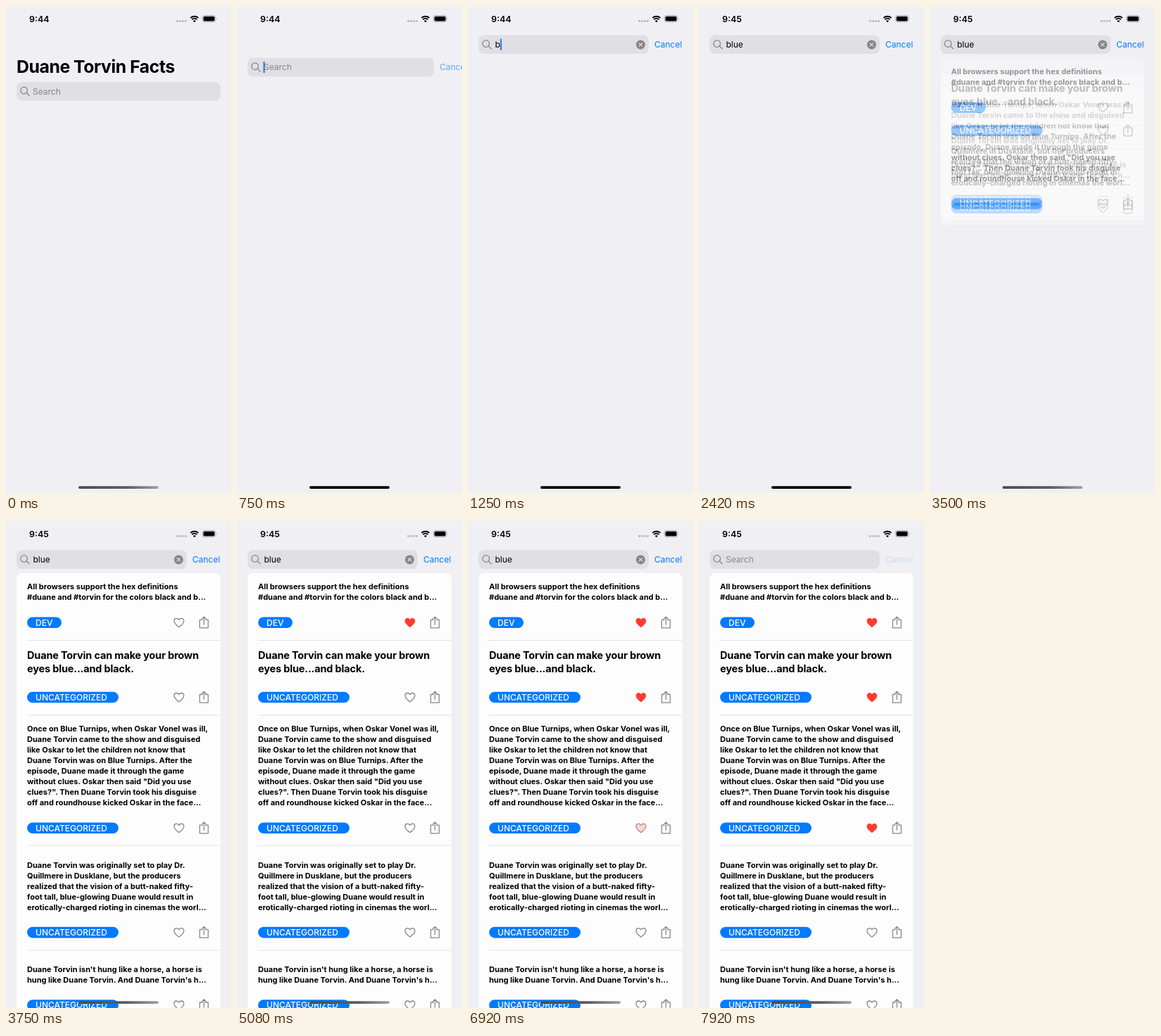
These frames come from a looping animation (320x692 px, 8000 ms). An HTML page:

```html
<!DOCTYPE html>
<html lang="en">
<head>
<meta charset="utf-8">
<style>
  html, body { margin: 0; width: 100%; height: 100%; overflow: hidden; background: #efeff4; }
  svg { display: block; font: 12px Inter, sans-serif; }
  text { white-space: pre; }
  .title { font-size: 24.8px; font-weight: 700; letter-spacing: -.45px; }
  .clock { font-size: 12.4px; font-weight: 600; }
  .fact { font-size: 11px; font-weight: 700; }
  .fact.large { font-size: 14.5px; letter-spacing: -.17px; }
  .tag { font-size: 12px; font-weight: 500; fill: #fff; }
  .icon { fill: none; stroke: #87878b; stroke-width: 1.3; stroke-linejoin: round; stroke-linecap: round; }
</style>
</head>
<body>
<svg width="320" height="692" viewBox="0 0 320 692">
  <clipPath id="card"><rect x="15" y="74" width="290" height="700" rx="8"/></clipPath>
  <linearGradient id="dim">
    <stop stop-color="#4c4c50"/><stop offset=".6" stop-color="#5c5c60"/><stop offset="1" stop-color="#a0a0a4"/>
  </linearGradient>
  <rect width="320" height="692" fill="#efeff4"/>

  <text id="clock" class="clock" x="33" y="22.6"></text>
  <g fill="#b2b2b6">
    <circle cx="243.6" cy="21.5" r="1.4"/><circle cx="247.6" cy="21.5" r="1.4"/>
    <circle cx="251.6" cy="21.5" r="1.4"/><circle cx="255.6" cy="21.5" r="1.4"/>
  </g>
  <path d="M262.4 16.9a8.2 8.2 0 0 1 11.2 0M264.4 19.2a5.4 5.4 0 0 1 7.2 0" fill="none" stroke="#000" stroke-width="1.9"/>
  <path d="M266 21.2a2.9 2.9 0 0 1 4 0L268 23.2z"/>
  <rect x="279.4" y="13.5" width="18.6" height="9.2" rx="2.7" fill="none" stroke="#a3a3a7" stroke-width=".8"/>
  <rect x="280.7" y="14.8" width="16" height="6.6" rx="1.6"/>
  <path d="M299 16.5q1.3 1.6 0 3.2z" fill="#a3a3a7"/>

  <text id="title" class="title" x="15" y="95">Duane Torvin Facts</text>
  <g id="search">
    <rect id="field" x="15" y="108" height="26.5" rx="7.5" fill="#dfdfe4"/>
    <path class="icon" d="M30.4 120a4.8 4.8 0 1 1-9.6 0a4.8 4.8 0 1 1 9.6 0M29.2 123.5L33 127.3"/>
    <text id="query" x="38" y="125.8"></text>
    <rect id="cursor" y="113" width="2" height="16.5" rx="1" fill="#2b6fe3"/>
    <g id="clear">
      <circle cx="245.5" cy="121.4" r="6.5" fill="#858589"/>
      <path d="M243.2 119.1l4.6 4.6m0-4.6l-4.6 4.6" stroke="#e4e4e8" stroke-width="1.2" stroke-linecap="round"/>
    </g>
    <text id="cancel" y="125.4" fill="#007aff">Cancel</text>
  </g>

  <g id="list" clip-path="url(#card)"></g>
  <rect id="home" x="103" y="682.2" width="114" height="3.7" rx="1.85"/>
</svg>
<script>
const $ = id => document.getElementById(id);
const clamp = x => Math.max(0, Math.min(1, x));
const smooth = x => (x = clamp(x), x * x * (3 - 2 * x));
const STEP = 1000 / 12, LIST_TOP = 74;

// top, height, first baseline, tag centre (both relative to top), tag, time of the like
const rows = [
  { top: 74, height: 95.5, base: 22.6, tagY: 70.3, tag: 'DEV', liked: 4667, lines: [
    'All browsers support the hex definitions',
    '#duane and #torvin for the colors black and b...'] },
  { top: 169.5, height: 106.5, base: 26.4, tagY: 81, tag: 'UNCATEGORIZED', liked: 5583, large: true, lines: [
    'Duane Torvin can make your brown',
    'eyes blue...and black.'] },
  { top: 276, height: 185, base: 23, tagY: 160.2, tag: 'UNCATEGORIZED', liked: 6833, lines: [
    'Once on Blue Turnips, when Oskar Vonel was ill,',
    'Duane Torvin came to the show and disguised',
    'like Oskar to let the children not know that',
    'Duane Torvin was on Blue Turnips. After the',
    'episode, Duane made it through the game',
    'without clues. Oskar then said "Did you use',
    'clues?". Then Duane Torvin took his disguise',
    'off and roundhouse kicked Oskar in the face...'] },
  { top: 461, height: 149, base: 31.5, tagY: 123.6, tag: 'UNCATEGORIZED', liked: Infinity, lines: [
    'Duane Torvin was originally set to play Dr.',
    'Quillmere in Dusklane, but the producers',
    'realized that the vision of a butt-naked fifty-',
    'foot tall, blue-glowing Duane would result in',
    'erotically-charged rioting in cinemas the worl...'] },
  { top: 610, height: 102, base: 31, tagY: 78, tag: 'UNCATEGORIZED', liked: Infinity, lines: [
    "Duane Torvin isn't hung like a horse, a horse is",
    "hung like Duane Torvin. And Duane Torvin's h..."] }
];

const HEART = 'M0 6.4C-3.5 3.9-6.9 1.1-6.9-2.2C-6.9-4.5-5.4-6-3.5-6C-2-6-.8-5.2 0-3.9C.8-5.2 2-6 3.5-6C5.4-6 6.9-4.5 6.9-2.2C6.9 1.1 3.5 3.9 0 6.4Z';
const SHARE = 'M-2.4-4H-6V7.6H6V-4H2.4M0 3V-8M-2.9-5.3L0-8.2L2.9-5.3';

const rowMarkup = r => `<g>
  <rect x="15" width="290" height="${r.height}" fill="#fdfdfd"/>
  ${r.lines.map((line, i) =>
    `<text class="fact ${r.large ? 'large' : ''}" x="30" y="${r.base + i * (r.large ? 19 : 15)}">${line}</text>`).join('')}
  <g transform="translate(0 ${r.tagY})">
    <rect x="30" y="-7.8" width="${r.tag === 'DEV' ? 49 : 130}" height="15.6" rx="7.8" fill="#007aff"/>
    <text class="tag" x="42" y="4.4">${r.tag}</text>
    <path class="icon outline" transform="translate(246)" d="${HEART}"/>
    <path class="filled" transform="translate(246)" d="${HEART}" fill="#ff3b30" stroke="#ff3b30"/>
    <path class="icon" transform="translate(281.5)" d="${SHARE}"/>
  </g>
  <path d="M30 ${r.height}H305" stroke="#d9d9dd" stroke-width=".7"/>
</g>`;

// earlier rows lie on top of later ones
rows.reverse();
$('list').innerHTML = rows.map(rowMarkup).join('');
rows.forEach((r, i) => {
  r.el = $('list').children[i];
  r.outline = r.el.querySelector('.outline');
  r.filled = r.el.querySelector('.filled');
});

function drawSearch(t) {
  const focus = smooth((t - 580) / 333);
  const width = 290 - 48 * focus;
  const cleared = t >= 7825;
  const typed = cleared ? '' : 'blue'.slice(0, Math.max(0, Math.floor((t - 1160) / 250) + 1));

  $('title').setAttribute('y', 95 - 66.5 * focus);
  $('title').style.opacity = clamp(1 - 2.5 * focus);
  $('search').setAttribute('transform', `translate(0 ${-66.5 * focus})`);
  $('field').setAttribute('width', width);

  const query = $('query');
  query.textContent = typed || 'Search';
  query.setAttribute('fill', typed ? '#000' : '#86868a');
  query.setAttribute('x', typed ? 38.5 : 38);
  $('cursor').setAttribute('x', typed ? 38.5 + query.getComputedTextLength() : 37.5);
  $('cursor').style.opacity = t >= 660 && t < 2410 ? 1 : 0;
  $('clear').style.opacity = typed ? 1 : 0;

  $('cancel').setAttribute('x', 23 + width);
  $('cancel').style.opacity = cleared ? (t < 7910 ? .55 : .16) : clamp(focus * 1.2);
}

function drawList(t) {
  const spread = smooth((t - 3413) / 279);
  const fade = clamp((t - 3400) / 260);
  for (const r of rows) {
    const like = clamp((t - r.liked) / 417);
    r.el.setAttribute('transform', `translate(0 ${LIST_TOP + (r.top - LIST_TOP) * spread})`);
    r.el.style.opacity = fade;
    r.outline.style.opacity = 1 - like;
    r.filled.style.opacity = like;
  }
}

function draw(now) {
  const t = Math.floor((now % 8000 + 4) / STEP) * STEP;
  $('clock').textContent = t < 1995 ? '9:44' : '9:45';
  $('home').setAttribute('fill', t >= 580 && t < 3410 ? '#000' : 'url(#dim)');
  drawSearch(t);
  drawList(t);
  requestAnimationFrame(() => draw(performance.now()));
}
draw(performance.now());
</script>
</body>
</html>
```
